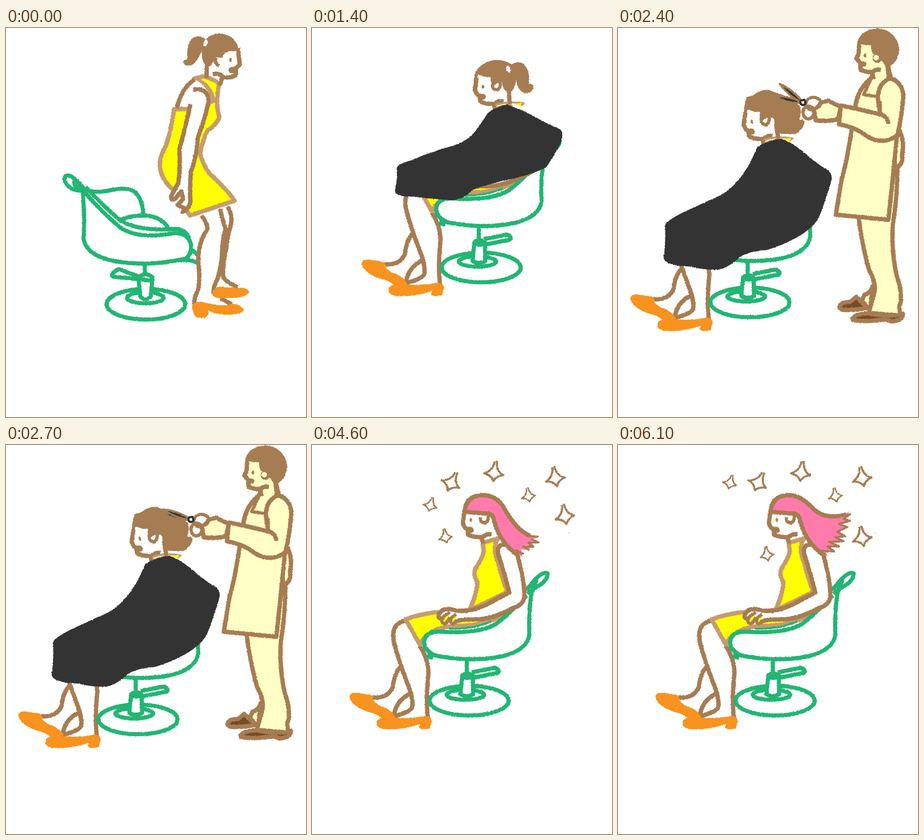
Recreate the animation shown at these times as an HTML page without scripts. Size 657 by 852 pixels, loop 7100 ms.

```html
<!DOCTYPE html>
<html lang="en">
<head>
<meta charset="utf-8">
<title>Salon visit</title>
<style>
html, body { margin: 0; width: 100%; height: 100%; overflow: hidden; background: #fff; }
svg { display: block; width: 657px; height: 852px; fill: none; stroke-linejoin: round; }
.brown { stroke: #a67c52; stroke-width: 9.5; }
.tan { stroke: #c69c6d; stroke-width: 9.5; }
.green { stroke: #22b573; stroke-width: 9; }
.medium { stroke-width: 7; }
.thin { stroke-width: 4.5; }
.flat { stroke: none; }
.solid { fill: #a67c52; }
.white { fill: #fff; }
.yellow { fill: #ff0; }
.cream { fill: #ffffc6; }
.orange { fill: #f7931e; }
.dark { fill: #333; }
.sole { fill: #754c24; }
</style>
</head>
<body>
<svg viewBox="0 0 657 852">
<defs>
  <filter id="rough" x="0" y="0" width="657" height="852" filterUnits="userSpaceOnUse" color-interpolation-filters="sRGB">
    <feTurbulence type="fractalNoise" baseFrequency=".35" numOctaves="2" seed="4"/>
    <feDisplacementMap in="SourceGraphic" scale="3.500" xChannelSelector="R" yChannelSelector="G"/>
  </filter>

  <!-- Chair facing right -->
  <g id="chairRight" class="green">
    <path d="M172 352Q190 363 225 356Q265 347 281 358Q299 373 301 410"/>
    <path class="white" d="M246 423Q270 409 310 411Q345 416 357 442"/>
    <path d="M404 484L422 498M382 509Q405 506 420 515"/>
    <path class="white" d="M168 358Q173 410 170 462Q176 499 240 511Q310 523 390 506Q407 500 405 474Q399 446 362 450Q290 463 252 438Q220 414 166 353"/>
    <path d="M174 348Q218 395 250 421Q290 446 372 440Q392 441 401 460"/>
    <path d="M170 357Q140 357 130 338Q124 322 138 323Q152 328 172 354M168 352Q148 349 149 335"/>
    <ellipse cx="306.500" cy="605" rx="86" ry="33.500"/>
    <ellipse cx="305" cy="591" rx="40" ry="12"/>
    <path d="M304 518V540M290 550L236 545Q224 541 247 528L292 545"/>
    <path class="white" d="M290 546L294 588Q305 600 317 588L321 546Q306 533 290 546ZQ306 557 321 550"/>
  </g>

  <!-- Chair facing left -->
  <g id="chairLeft" class="green">
    <path d="M252 460L266 464" stroke-width="14"/>
    <path class="white" d="M482 318Q474 360 476 415Q472 448 420 462Q350 477 270 461Q240 448 247 424Q254 407 285 409Q365 414 403 392Q430 372 470 330"/>
    <path class="thin" d="M300 402Q355 404 392 386"/>
    <path d="M469 318L490 293Q508 276 516 281Q517 292 502 305Q488 312 472 326M478 312Q492 304 491 293"/>
    <ellipse cx="344" cy="560" rx="86.500" ry="32.500"/>
    <ellipse cx="336" cy="547" rx="41" ry="11"/>
    <path d="M339 470V496M350 498L400 488Q413 493 407 499L352 510"/>
    <path class="white" d="M329 505L325 546Q340 554 353 546L352 505Q340 496 329 505ZQ340 515 352 505"/>
  </g>

  <!-- Customer facing right -->
  <g id="headRight">
    <path class="brown" d="M440 78L439 110M508 44L510 64L512 80L504 88L503 103Q494 110 474 108L468 126M476 108Q468 98 453 101"/>
    <path class="solid" d="M433 35Q440 14 466 12Q500 14 508 42Q507 54 492 50Q476 54 474 65L458 64Q452 84 440 87Q429 78 429 50Q420 70 411 79Q396 87 388 77Q388 68 397 68Q395 32 410 21Q425 14 437 25Z"/>
    <path class="brown medium" d="M460 65Q455 77 467 83"/>
    <ellipse class="white" cx="437" cy="33" rx="4.500" ry="7.500" transform="rotate(20 437 33)"/>
    <ellipse class="solid" cx="492" cy="70" rx="2.700" ry="4.500"/>
    <ellipse class="solid" cx="496" cy="92" rx="9" ry="7"/>
  </g>
  <g id="shoesRight" class="orange">
    <path d="M452 578Q458 563 480 568Q510 569 520 569Q534 574 532 580Q520 593 488 591Q460 595 452 585Z"/>
    <path d="M407 612Q407 598 430 600Q475 612 492 604Q512 603 521 617Q518 629 475 628Q452 625 442 617Q448 630 434 635Q414 637 411 625Z"/>
  </g>
  <g id="standing">
    <path class="brown" d="M485 391Q496 408 493 428Q484 460 482 485Q476 505 475 545Q482 556 507 568M469 396Q475 425 481 440Q473 465 473 500Q468 545 456 565L454 582M428 411Q441 426 441 440Q421 470 421 510Q426 550 420 575Q412 590 412 606M470 592L494 605"/>
    <use href="#shoesRight"/>
    <path class="tan yellow" d="M368 178Q358 245 345 268Q330 297 343 325Q355 350 378 362L402 411L501 378Q480 350 445 318Q432 300 425 276Q432 240 442 224Q465 208 467 194Q458 165 467 122Q452 110 432 106L412 111Q450 125 454 160L404 177Z"/>
    <path class="white" d="M374 172Q385 130 412 113Q444 125 444 160Q437 195 420 240Q418 280 405 315Q402 350 404 385L384 398L366 372L377 340Q383 310 380 270Q390 220 404 168Z"/>
    <path class="brown" d="M374 176Q385 130 413 113M410 135Q442 130 444 160Q437 195 420 240Q418 280 405 315Q402 350 404 382Q396 404 383 402M404 167Q391 225 380 265Q382 315 377 340L362 368Q360 380 370 374L384 358L388 374L376 388L392 395"/>
    <use href="#headRight"/>
  </g>
  <g id="sitting">
    <path class="white" d="M375 390Q432 383 433 393Q413 430 412 460V560L447 545L452 505Q464 475 472 440L489 365Q485 328 452 322Z"/>
    <path class="brown" d="M452 322Q488 330 489 365Q480 410 472 440Q464 475 452 505L447 545M372 390Q432 383 433 393Q413 430 412 460Q411 500 412 530Q402 550 402 570M474 432Q479 455 472 490Q478 514 507 530M460 552L493 571"/>
    <use href="#shoesRight" transform="matrix(1.09 0 0 1.05 -46 -64)"/>
    <path class="tan yellow" d="M320 116Q350 117 379 144Q368 165 377 207Q362 225 362 242Q363 275 369 302L420 306Q456 303 452 318Q430 348 390 370L364 395Q315 382 280 365Q259 350 264 318Q275 300 274 265L298 232L322 203Q347 175 349 150Q342 130 320 116Z"/>
    <path class="white" d="M328 124Q298 132 288 160Q268 202 258 235Q258 257 275 264Q315 308 385 318L400 332L426 326Q425 305 405 303Q370 300 355 290Q325 252 298 232L322 203Q347 175 349 150Z"/>
    <path class="brown" d="M328 124Q298 132 288 160Q268 202 258 235Q258 257 275 264Q315 308 385 318M349 148Q347 175 322 203L298 232Q325 252 355 290Q370 300 405 303Q427 306 426 328"/>
    <path class="brown medium" d="M396 309Q378 324 392 334L402 314L408 338L416 311L424 329"/>
    <use href="#headRight" transform="translate(-66 16) rotate(15 437 33)"/>
  </g>

  <!-- Customer facing left -->
  <g id="seated">
    <path class="brown" d="M195 485Q180 500 177 530Q166 556 132 553M214 545Q181 562 179 598"/>
    <path class="white" d="M205 384Q172 392 179 430L220 560V585L252 595Q249 550 255 500Q255 470 236 440Z"/>
    <path class="brown" d="M207 384Q172 390 179 430Q186 460 208 520Q221 550 220 572Q219 584 180 594M236 440Q255 470 255 500Q249 560 254 598"/>
    <g class="orange">
      <path d="M82 552Q82 541 100 543L128 547Q137 552 134 558Q142 571 160 575Q180 586 182 598L152 598Q140 588 125 585Q88 574 82 552Z"/>
      <path d="M141 608Q142 594 180 597Q215 600 250 593Q264 596 262 606L258 621Q235 625 234 618L237 611Q195 626 155 622Q140 618 141 608Z"/>
    </g>
    <path class="tan yellow" d="M374 214L407 205Q394 228 408 258Q414 285 428 322L345 362Q362 322 362 300Q352 285 358 270Q375 245 376 232Z"/>
    <path class="tan yellow" d="M205 382Q245 367 290 365L345 362L435 362Q390 396 320 396Q255 398 236 437Z"/>
    <use href="#chairLeft"/>
    <path class="white" d="M410 246Q403 230 412 220Q440 212 449 238Q466 300 465 332Q462 352 440 357Q390 385 345 382L310 393L288 392L277 376L290 360L340 363Q370 358 400 340L432 323Q423 285 410 246Z"/>
    <path stroke="#ff0" stroke-width="7" d="M297 372L290 386M313 374L307 388"/>
    <path class="brown" d="M313 388Q322 382 345 382Q390 385 440 357Q462 352 465 332Q466 300 449 238Q440 212 412 220Q403 230 410 246Q423 285 432 323L400 340Q370 358 340 363Q325 365 310 361Q286 355 278 371Q275 380 284 380"/>
    <path class="brown medium" d="M302 367Q282 376 285 388Q293 398 302 377M316 371Q299 379 304 389Q312 395 319 383"/>
  </g>
  <g id="face">
    <path class="brown" d="M334 144L332 160L330 171L335 181L341 185L342 196Q350 202 371 202L375 216M372 205Q380 193 393 196"/>
    <path class="brown medium" d="M369 158Q367 170 379 171Q389 166 385 150"/>
    <ellipse class="solid" cx="348" cy="164" rx="2.700" ry="4.500"/>
    <ellipse class="solid" cx="346" cy="186" rx="8.500" ry="7"/>
  </g>
  <g id="ponytail" transform="translate(-26.500 35.500)">
    <path class="tan thin" d="M402 168Q435 160 464 165L456 171"/>
    <path class="yellow" d="M445 168L459 163L458 172Z"/>
    <path class="brown" d="M431 135L433 166"/>
    <path class="solid" d="M355 128Q349 88 385 74Q413 63 437 80Q452 70 465 80Q478 95 475 122Q485 121 485 132Q480 144 466 143Q450 137 447 113Q446 135 432 141Q418 140 416 116L398 126Q390 122 392 108Q378 108 364 102Z"/>
    <ellipse class="white" cx="430" cy="90" rx="4.500" ry="7.500" transform="rotate(-20 430 90)"/>
  </g>
  <g id="bunch" transform="translate(55 -41)">
    <path class="tan thin" d="M320 245Q352 236 382 242L374 248"/>
    <path class="yellow" d="M362 245L378 240L377 248Z"/>
    <path class="brown" d="M346 210L351 242"/>
    <path class="solid" d="M274 206Q276 160 283 150Q296 150 305 141Q325 130 343 141Q365 144 398 170Q403 185 397 200Q410 200 408 210Q404 222 398 224Q392 235 375 232L356 232Q344 228 342 200Q335 190 315 203Q308 200 311 184Q297 184 284 178Z"/>
  </g>
  <g id="hairDown">
    <path d="M333 146Q338 108 378 110Q405 112 420 137Q448 188 468 196L494 204L480 206L496 212L476 212L484 222L466 219L475 230L453 228L462 245L446 238Q408 210 398 164Q394 148 378 150Z"/>
    <path class="brown" d="M452 242Q412 215 400 170Q396 146 378 150L334 146Q338 108 378 110Q405 112 420 137Q448 188 478 199"/>
    <path class="brown thin" d="M472 199L496 201M480 206L496 213L474 214L485 223L463 222L476 231M446 230L462 238L444 236"/>
  </g>
  <g id="hairBlown">
    <path d="M333 146Q338 108 378 110Q402 112 428 140Q455 163 485 156L507 146L497 160L506 166L488 175L502 182L484 190L497 198L478 204L496 211L468 214L484 223L461 222L476 233L452 232L461 244L446 238Q408 210 398 164Q394 148 378 150Z"/>
    <path class="brown" d="M452 242Q412 215 400 170Q396 146 378 150L334 146Q338 108 378 110Q402 112 428 140Q455 165 500 152"/>
    <path class="brown thin" d="M490 156L508 152L494 162L508 166L484 173L502 180L480 190L498 200L476 202L494 211L462 212L484 222L458 222L474 233L446 232"/>
  </g>
  <path id="capeFull" class="dark" transform="translate(-26.500 35.500)" d="M387 184Q400 174 435 166Q455 168 490 197Q515 220 540 234Q552 242 549 258Q535 305 522 337Q510 362 470 384Q440 400 410 409Q370 412 348 425Q320 452 298 453Q265 453 240 446Q185 445 181 426Q187 395 184 357Q185 345 240 320Q280 302 310 288Q345 265 370 220Z"/>
  <path id="capeHalf" class="dark" transform="translate(56 -42)" d="M304 262Q320 250 345 245Q390 262 425 283L460 299Q469 304 464 325Q450 355 430 383Q395 400 350 409Q300 420 270 432Q250 452 225 455Q180 452 140 447Q100 448 99 433Q105 410 103 385Q103 376 135 367Q180 348 230 334Q260 325 280 297Z"/>
  <g id="styled"><use href="#seated"/><use href="#face"/></g>

  <!-- Hairdresser -->
  <g id="barber" class="brown">
    <path class="cream" d="M558 565Q555 580 540 584L534 598L552 618Z"/>
    <path class="sole" d="M485 609Q490 600 508 600L522 589L546 613Q515 619 492 617Q484 614 485 609Z"/>
    <path class="cream" d="M527 415Q535 480 550 530Q567 560 561 582L549 624L620 630Q613 615 619 600Q622 575 611 545Q598 490 602 430Q612 370 612 300Z"/>
    <path class="sole" d="M514 636Q520 626 548 625Q600 634 624 626Q624 640 600 643L585 638Q540 645 514 639Z"/>
    <path class="cream" d="M617 225Q628 250 622 280Q625 298 608 308L600 250Z"/>
    <path class="cream" d="M556 108Q527 132 521 165L512 220Q502 290 490 330L477 409L592 420Q600 350 612 225L598 112L590 78L558 92Z"/>
    <path class="medium" d="M554 112L538 146L566 150"/>
    <path class="cream flat" d="M527 40L522 66L532 94L558 98L590 85L575 30Z"/>
    <path d="M528 38L527 56L522 67L530 76L532 92Q542 97 557 96L559 112M556 98Q564 89 575 92M590 78L593 110"/>
    <path class="solid flat" d="M523 50Q520 3 570 1Q612 6 616 48Q612 80 588 87L578 72L563 60Q554 55 554 38L532 36Z"/>
    <circle class="cream medium" cx="568" cy="66" r="7"/>
    <circle class="cream flat" cx="565" cy="65" r="6"/>
    <ellipse class="solid flat" cx="541" cy="60" rx="2.500" ry="4.500"/>
    <ellipse class="solid flat" cx="537" cy="79" rx="7" ry="6"/>
    <g class="medium">
      <ellipse cx="428" cy="166" rx="17" ry="14"/>
      <ellipse cx="417" cy="185" rx="12" ry="14"/>
    </g>
    <path class="cream" d="M488 172Q475 168 461 159L443 164L440 171L429 178L433 202Q455 206 482 200Z"/>
    <path class="cream" d="M573 186L569 150Q572 118 597 110Q624 120 625 150Q622 190 612 235Q580 258 545 237Q520 217 484 211L488 170Q530 178 570 188Q590 195 592 210"/>
    <path class="cream flat" d="M565 180L580 150L600 205L590 215Z"/>
    <path d="M573 160V187Q591 195 592 210"/>
  </g>
  <g id="pivot"><circle class="dark" cx="405" cy="163" r="8"/><circle class="white" cx="405" cy="163" r="3"/></g>
  <path id="blade" class="brown dark thin" d="M405 163Q380 168 341 150Q375 148 405 163Z"/>
  <g id="scissorsOpen">
    <use href="#blade"/><use href="#blade" transform="rotate(27 405 163)"/><use href="#pivot"/>
  </g>
  <g id="scissorsClosed">
    <use href="#blade"/><use href="#blade" transform="rotate(8 405 163)"/><use href="#pivot"/>
  </g>

  <path id="star" class="brown thin" d="M7 -23Q5 0 21 8Q5 10 -1 21Q-6 7 -21 4Q-1 -2 2 -22"/>
  <use id="smallStar" href="#star" transform="scale(.72)"/>
  <g id="sparkles">
    <use href="#star" transform="translate(305 80) rotate(18)"/>
    <use href="#star" transform="translate(398 58)"/>
    <use href="#star" transform="translate(531 70) rotate(-18)"/>
    <use href="#smallStar" transform="translate(473 110) rotate(-18)"/>
  </g>
</defs>

<g filter="url(#rough)">
  <!-- Sitting down -->
  <g>
    <animate attributeName="display" values="inline;none" keyTimes="0;.04225" calcMode="discrete" dur="7.1s" repeatCount="indefinite"/>
    <use href="#chairRight"/><use href="#standing"/>
  </g>
  <g display="none">
    <animate attributeName="display" values="none;inline;none" keyTimes="0;.04225;.0845" calcMode="discrete" dur="7.1s" repeatCount="indefinite"/>
    <use href="#chairRight" transform="translate(-21 -3)"/>
    <use href="#standing" transform="translate(-21 4) translate(0 600) skewX(-6.500) translate(0 -600)"/>
  </g>
  <g display="none">
    <animate attributeName="display" values="none;inline;none" keyTimes="0;.0845;.12676" calcMode="discrete" dur="7.1s" repeatCount="indefinite"/>
    <use href="#chairRight" transform="translate(-2 -38)"/><use href="#sitting"/>
  </g>

  <!-- Turned round and wrapped -->
  <g display="none" transform="translate(26.500 -35.500)">
    <animate attributeName="display" values="none;inline;none" keyTimes="0;.12676;.33802" calcMode="discrete" dur="7.1s" repeatCount="indefinite"/>
    <use href="#styled"/>
    <use href="#ponytail"/>
    <use href="#capeHalf" display="none">
      <animate attributeName="display" values="none;inline;none" keyTimes="0;.19718;.2676" calcMode="discrete" dur="7.1s" repeatCount="indefinite"/>
    </use>
    <use href="#capeFull" display="none">
      <animate attributeName="display" values="none;inline" keyTimes="0;.2676" calcMode="discrete" dur="7.1s" repeatCount="indefinite"/>
    </use>
  </g>

  <!-- Haircut -->
  <g display="none">
    <animate attributeName="display" values="none;inline;none" keyTimes="0;.33802;.64788" calcMode="discrete" dur="7.1s" repeatCount="indefinite"/>
    <g transform="translate(-55 41)">
      <animate attributeName="display" values="inline;none" keyTimes="0;.42253" calcMode="discrete" dur="7.1s" repeatCount="indefinite"/>
      <use href="#styled"/><use href="#bunch"/><use href="#capeFull"/>
    </g>
    <g transform="translate(-56 42)" display="none">
      <animate attributeName="display" values="none;inline" keyTimes="0;.42253" calcMode="discrete" dur="7.1s" repeatCount="indefinite"/>
      <use href="#styled"/><use href="#capeHalf"/><use href="#hairDown" fill="#a67c52"/>
    </g>
    <use href="#barber"/>
    <use href="#scissorsOpen">
      <animate attributeName="display" values="inline;none;inline;none;inline" keyTimes="0;.38028;.42253;.46478;.50704" calcMode="discrete" dur="7.1s" repeatCount="indefinite"/>
    </use>
    <use href="#scissorsClosed" display="none">
      <animate attributeName="display" values="none;inline;none;inline;none" keyTimes="0;.38028;.42253;.46478;.50704" calcMode="discrete" dur="7.1s" repeatCount="indefinite"/>
    </use>
  </g>

  <!-- New look -->
  <g display="none">
    <animate attributeName="display" values="none;inline" keyTimes="0;.64788" calcMode="discrete" dur="7.1s" repeatCount="indefinite"/>
    <use href="#styled"/>
    <circle class="solid" cx="563" cy="192" r="1"/>
    <g>
      <animate attributeName="display" values="inline;none;inline;none;inline;none" keyTimes="0;.69014;.73239;.77464;.8169;.85915" calcMode="discrete" dur="7.1s" repeatCount="indefinite"/>
      <use href="#hairDown" fill="#ff7bac"/>
      <use href="#sparkles"/>
      <use href="#star" transform="translate(552 153) rotate(-18)"/>
      <use href="#smallStar" transform="translate(259 130) rotate(8)"/>
      <use href="#smallStar" transform="translate(291 200) rotate(-18)"/>
    </g>
    <g display="none">
      <animate attributeName="display" values="none;inline;none;inline;none;inline" keyTimes="0;.69014;.73239;.77464;.8169;.85915" calcMode="discrete" dur="7.1s" repeatCount="indefinite"/>
      <use href="#hairBlown" fill="#ff7bac"/>
      <use href="#sparkles" x="2"/>
      <use href="#star" transform="translate(533 201) rotate(-18)"/>
      <use href="#smallStar" transform="translate(245 81) rotate(8)"/>
      <use href="#smallStar" transform="translate(325 239) rotate(-18)"/>
    </g>
  </g>
</g>
</svg>
</body>
</html>
```
